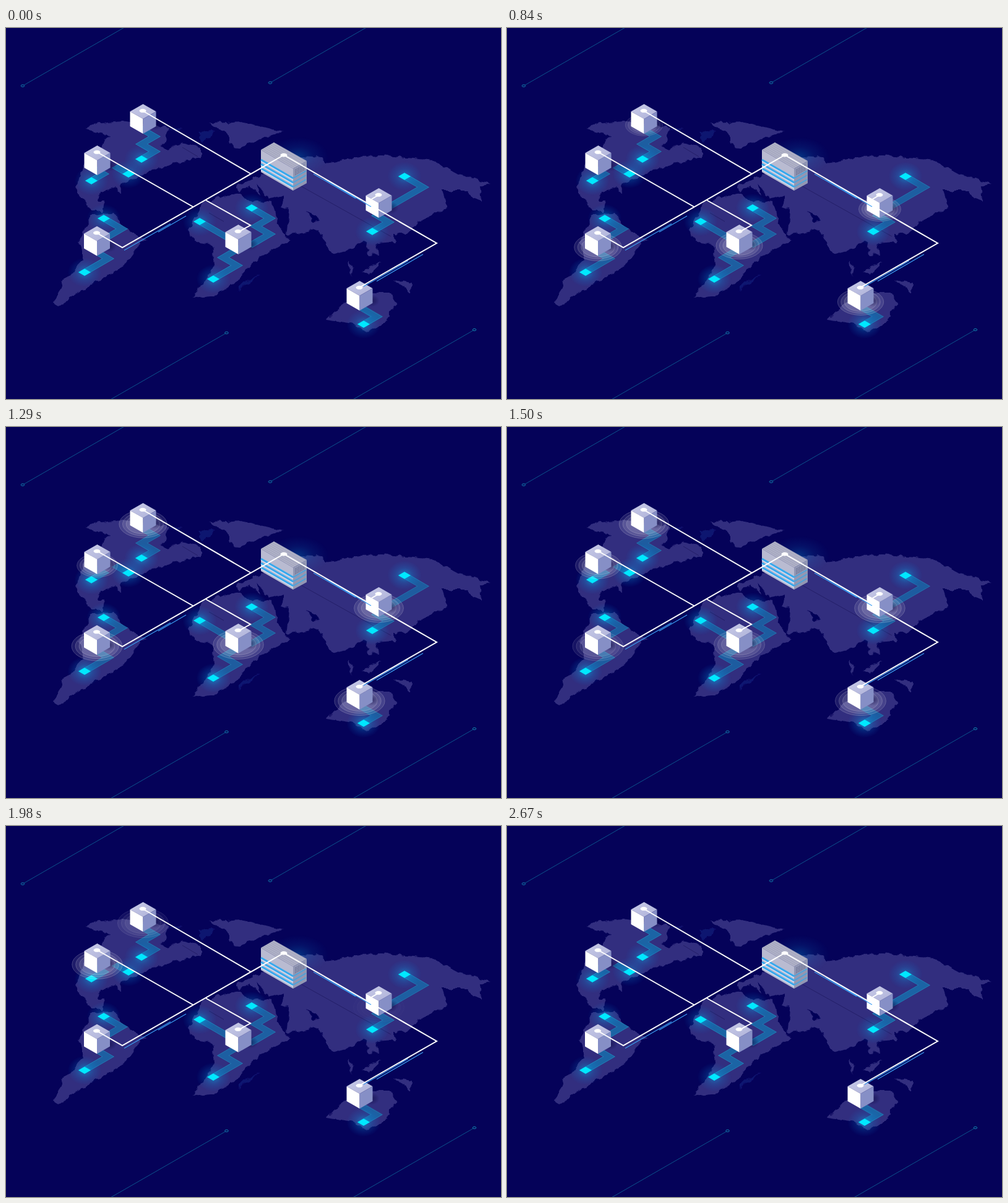
Write an HTML page that moves like this. It is 800 px wide and 600 px high and loops after 2700 ms.

```html
<!DOCTYPE html>
<html lang="en">
<head>
<meta charset="utf-8">
<title>Network map</title>
<style>
  html, body { margin: 0; width: 100%; height: 100%; overflow: hidden; background: #050259; }
  svg { display: block; width: 800px; height: 600px; }
</style>
</head>
<body>
<svg id="stage" viewBox="0 0 800 600" fill="none">
  <defs>
    <radialGradient id="glow">
      <stop offset="0" stop-color="#00c8ff" stop-opacity=".55"/>
      <stop offset=".5" stop-color="#0a9be8" stop-opacity=".22"/>
      <stop offset="1" stop-color="#0a80e0" stop-opacity="0"/>
    </radialGradient>
    <radialGradient id="shade">
      <stop offset="0" stop-color="#0b0840" stop-opacity=".6"/>
      <stop offset="1" stop-color="#0b0840" stop-opacity="0"/>
    </radialGradient>
    <linearGradient id="lid" x2="1" y2="1">
      <stop stop-color="#c9cbe8"/><stop offset="1" stop-color="#aeb2d9"/>
    </linearGradient>
    <pattern id="hatch" width="3" height="3" patternUnits="userSpaceOnUse" patternTransform="rotate(30)">
      <path d="M0 1h3" stroke="#8e92ae" stroke-width=".8"/>
    </pattern>
    <filter id="coast" x="0" y="0" width="800" height="600" filterUnits="userSpaceOnUse">
      <feTurbulence type="fractalNoise" baseFrequency=".08" numOctaves="2" seed="4"/>
      <feDisplacementMap in="SourceGraphic" scale="11" xChannelSelector="R" yChannelSelector="G"/>
    </filter>
  </defs>
  <g id="map" fill="#312e7f" filter="url(#coast)">
    <path d="M128 166L139 154 188 150 264 162 251 190 262 197 284 186 314 194 314 208 240 229 185 252 186 269 177 259 152 264 149 280 160 280 156 299 130 287 112 258 129 216 168 174Z"/>
    <path d="M330 154L385 152 448 168 412 180 378 193 364 192 359 174Z"/>
    <path d="M137 304L174 299 186 317 224 344 208 360 190 385 130 420 86 449 78 444 92 412 125 376 117 345Z"/>
    <path d="M320 281L377 266 388 278 429 283 448 334 460 342 397 380 376 406 342 430 300 437 337 384 334 351 303 343 295 329Z"/>
    <path d="M374 264L377 253 414 237 478 207 510 209 519 219 573 207 606 206 690 214 730 235 782 251 764 256 768 283 744 263 705 263 714 291 668 312 646 334 627 333 628 346 599 348 602 366 588 367 578 343 546 362 527 366 506 326 453 335 457 294 443 289 450 270 425 276 406 253 411 271 394 256Z"/>
    <path d="M517 472L545 444 580 430 622 430 631 443 612 478 584 491 561 479Z"/>
    <path d="M555 374L562 384 558 402ZM576 391L608 379 587 399ZM628 407L655 412 654 431Z"/>
    <path d="M310 168L337 167 320 186ZM263 164L284 161 278 168ZM374 426L385 411 411 399Z" fill="#11136f"/>
    <path d="M487 296L507 312 496 313Z" fill="#050259"/>
  </g>
</svg>
<script>
const stage = document.getElementById('stage');
const LOOP = 2700;

// Top corner of each cube and the moment its rings start
const cubes = [
  [221.5, 123, 570], [147.5, 190, 920], [147, 320.5, 150],
  [375.5, 318, 210], [602.5, 259, 420], [571.5, 409, 240]
];
// Tile centre and its track in tile units on the isometric grid
const tracks = [
  [219, 212, 'v-2.1h-2.1v-2.1h-2'], [138, 247, 'v-1.9h-2'], [198, 236, 'h-1.7'],
  [158, 308, 'h2.9v2.4'], [127, 395, 'v-3.8h-2'], [313, 313, 'h5'],
  [397, 291, 'h2.9v2.2h2.2v2.8'], [335, 406, 'v-3.8h-2.2v-2.4'],
  [644, 240, 'h3v5.5'], [592, 329, 'v-2.6h-1.8'], [578, 479, 'v-2.1h-2']
];
// Start of each background line and its direction
const decor = [[27, 93.5, 1], [427, 88.5, 1], [356.5, 493, -1], [757, 488, -1]];

const path = (d, attrs) => `<path d="${d}" ${attrs}/>`;
const ellipse = (x, y, rx, ry, attrs) => `<ellipse cx="${x}" cy="${y}" rx="${rx}" ry="${ry}" ${attrs}/>`;
const iso = (x, y, body) => `<g transform="matrix(10 5.8 -10 5.8 ${x} ${y})">${body}</g>`;
const disc = (x, y) => ellipse(x, y, 5.5, 3, 'fill="#fff"');

const drawDecor = ([x, y, dir]) =>
  path(`M${x} ${y}l${dir * 240} ${dir * -138}`, 'stroke="#0d5c92" stroke-width=".9"') +
  ellipse(x, y, 2.8, 1.7, 'stroke="#1280ae" fill="#050259"');

const drawTrack = ([x, y, d]) => iso(x, y,
  path('M0 0' + d, 'stroke="#2194c4" stroke-linecap="square"') +
  path('M0 0' + d, 'stroke="#1a68a8" stroke-width=".88" stroke-linecap="square"'));

const drawGlow = ([x, y]) => ellipse(x, y, 28, 24, 'fill="url(#glow)"');
const drawTile = ([x, y]) => iso(x, y, path('M-.5-.5h1v1h-1z', 'fill="#00e8ff"'));

const drawRings = () => '<g class="ring">' + [41, 35, 29].map(r =>
  ellipse(0, 0, r, r * .577, 'fill="#fff" fill-opacity=".1" stroke="#e6e2e8" stroke-opacity=".3" stroke-width=".8"')
).join('') + '</g>';

const drawCube = ([x, y]) =>
  ellipse(x + 19, y + 32, 13, 10, 'fill="url(#shade)"') +
  path(`M${x} ${y}l21 12-21 12-21-12z`, 'fill="url(#lid)"') +
  path(`M${x - 21} ${y + 12}l21 12v24l-21-12z`, 'fill="#fff"') +
  path(`M${x + 21} ${y + 12}l-21 12v24l21-12z`, 'fill="#868fc6"');

function drawServer() {
  const top = 'M433 185l53 30-22 12.5-52-30.5z';
  let s = ellipse(472, 208, 50, 32, 'fill="url(#glow)" opacity=".45"') +
    path(top, 'fill="#b5b7cb"') + path(top, 'fill="url(#hatch)"') +
    path('M412 197l52 30.5v35.5l-52-30z', 'fill="#b9bbd1"') +
    path('M486 215l-22 12.5v35.5l22-12z', 'fill="#9297b4"');
  for (let i = 0; i < 3; i++) {
    const y = 213 + i * 7;
    s += path(`M412 ${y}l52 30`, 'stroke="#35a9ee" stroke-width="3"') +
      path(`M412 ${y + 2.5}l52 30`, 'stroke="#d5e5fa" stroke-width="1.2"') +
      path(`M464 ${y + 30}l21-12`, 'stroke="#4ba3dc" stroke-width="1.8"');
  }
  for (let i = 0; i < 4; i++)
    s += path(`M467 ${230 + i * 2.5}l16-9`, 'stroke="#555a7d" stroke-width=".9" stroke-dasharray="2 1"');
  return s;
}

const each = (list, draw) => list.map(draw).join('');

stage.insertAdjacentHTML('beforeend',
  each(decor, drawDecor) +
  path('M470 252l152 85M285 193l25 15M328 299l24 14', 'stroke="#201b62" stroke-width=".8"') +
  `<g id="tracks">${each(tracks, drawTrack)}</g><g id="glows">${each(tracks, drawGlow)}</g>` +
  each(tracks, drawTile) + each(cubes, drawRings) + each(cubes, drawCube) + drawServer() +
  path('M191 359.5l75-43M246 330l45-26M497 236l68 39.5M515 244.5l75 44.5M599 409.5l75-43.5M578 418l72-41.5',
    'stroke="#3c9df2" stroke-width="1.2"') +
  path('M146 331L188 355 449 205.5 696 348 570.5 420M221 134L396 236M147 200.5L302 289M322 278L395 319 375.5 330M604 269L582 282',
    'stroke="#fff" stroke-width="2"') +
  each(cubes, ([x, y]) => disc(x - .5, y + 10.8)) + disc(449, 205.5)
);

const rings = [...document.querySelectorAll('.ring')];
const trackLayer = document.getElementById('tracks');
const glowLayer = document.getElementById('glows');
const clamp = v => Math.min(1, Math.max(0, v));

function frame() {
  const t = performance.now() % LOOP;
  rings.forEach((ring, i) => {
    const [x, y, start] = cubes[i];
    const age = t - start;
    const scale = 1 - .5 * (1 - clamp(age / 1400)) ** 3;
    ring.setAttribute('transform', `translate(${x} ${y + 34}) scale(${scale})`);
    ring.setAttribute('opacity', clamp(age / 350) * clamp((1600 - age) / 350));
  });
  const wave = Math.cos(2 * Math.PI * t / LOOP);
  trackLayer.setAttribute('opacity', .87 + .07 * wave);
  glowLayer.setAttribute('opacity', .9 - .1 * wave);
  requestAnimationFrame(frame);
}
frame();
</script>
</body>
</html>
```
